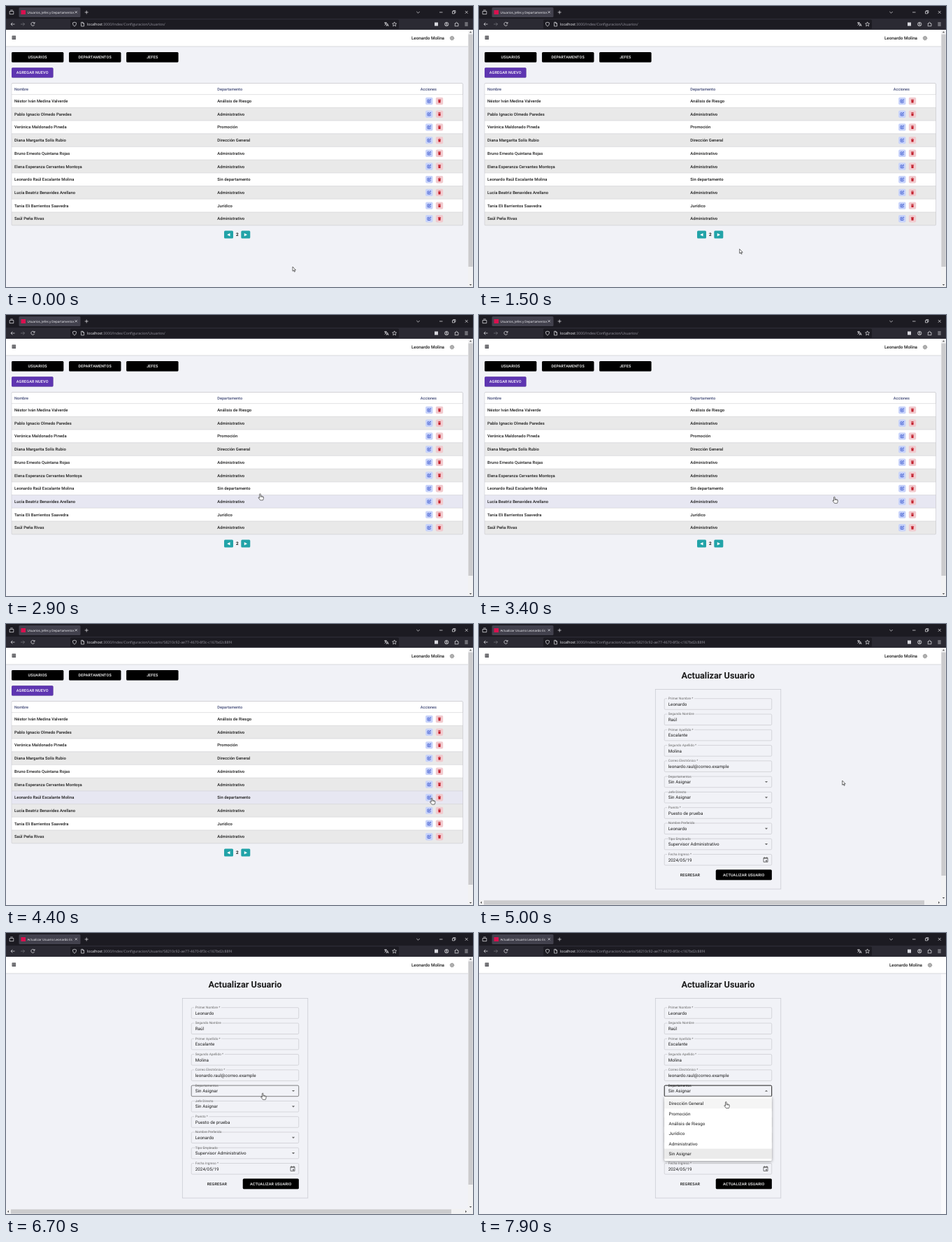
Write an HTML page that moves like this. It is 668 px wide and 402 px high and loops after 8 s.

```html
<!DOCTYPE html>
<html lang="es">
<head>
<meta charset="utf-8">
<title>Usuarios</title>
<style>
html, body { margin: 0; width: 100%; height: 100%; overflow: hidden; background: #f1f2f7; }
svg { display: block; width: 100vw; height: 100vh; }
text { font: 5.87px Roboto, sans-serif; fill: #1b1b1b; text-rendering: geometricPrecision; white-space: pre; }
.ui { font-family: "Open Sans", "Noto Sans", sans-serif; fill: #fbfbfe; }
.url { font-size: 5.22px; }
.dim { fill: #96959f; }
.tab { font-size: 4.45px; }
.cell { font-weight: 500; letter-spacing: .04px; }
.head { font-size: 5.6px; font-weight: 500; fill: #434b78; }
.btn { font-size: 5.48px; font-weight: 500; letter-spacing: .16px; text-anchor: middle; }
.value { font-size: 6.26px; letter-spacing: .06px; }
.label { font-size: 4.7px; letter-spacing: .04px; fill: #666; }
.light { fill: #fff; }
.line { fill: none; stroke: #fbfbfe; stroke-width: .65; }
.raised { filter: drop-shadow(0 .7px .7px #0006); }
.box { fill: none; stroke: #bdbec3; stroke-width: .55; }
.box.over { stroke: #212121; }
.box.focus { stroke: #111; stroke-width: .95; }
</style>
</head>
<body>
<svg id="stage" viewBox="0 0 668 402" preserveAspectRatio="none"></svg>
<script>
const LOOP = 8000, STEP = 100;
const OPEN_URL = 4400, FORM = 4500, LOADED = 4700, MENU = 7400;
const PAGE = '#f1f2f7';

const rect = (x, y, w, h, fill, extra = '') =>
  `<rect x="${x}" y="${y}" width="${w}" height="${h}" fill="${fill}" ${extra}/>`;
const text = (x, y, str, cls, extra = '') => `<text x="${x}" y="${y}" class="${cls}" ${extra}>${str}</text>`;
const path = (d, extra = 'class="line"') => `<path d="${d}" ${extra}/>`;
const group = (id, body, extra = '') => `<g id="${id}" ${extra}>${body}</g>`;
const button = (x, y, w, h, fill, str) =>
  rect(x, y, w, h, fill, 'rx="1.5" class="raised"') + text(x + w / 2, y + h / 2 + 2, str, 'btn light');

// Browser frame
const chrome = () => [
  rect(0, 0, 668, 18, '#1c1b22'), rect(0, 18, 668, 16, '#2b2a33'),
  rect(18.5, 2, 88, 14, '#42414d', 'rx="1.5"'), rect(21.5, 6, 6.5, 6, '#d9104f'),
  group('tabText', text(30.5, 10.8, '', 'ui tab'), 'clip-path="url(#tabClip)"'),
  path('M98.8 7.3l3 3m0-3l-3 3M112.700 9h5M115.200 6.500v5M587.300 8l2.200 2.200L591.700 8M620 9h4.500M656.800 7l3.800 3.800m0-3.800l-3.800 3.800M638.500 7.700h3.200v3.200h-3.200zM639.700 7.500V6.600h3.200v3.200h-1'),
  path('M5.200 7.500h5.600v4.200h-5.600zM6.200 5.900h3.600'),
  path('M12.500 26H7m2.300-2.300L7 26l2.300 2.300M40.600 24.700A2.500 2.500 0 1 0 40.700 26.700M41 23v2h-2'),
  path('M21 26h5.500m-2.300-2.300l2.300 2.300-2.300 2.300', 'class="line" opacity=".4"'),
  rect(92, 19.5, 470, 13, '#1c1b22', 'rx="1.5"'),
  path('M98 23.200l2.500.8c0 2.700-.7 4.200-2.500 5-1.800-.8-2.500-2.300-2.500-5zM107.600 23.300h2.400l1.600 1.600v4h-4zM109.800 23.300v1.800h1.800'),
  '<text id="url" y="27.800" x="116" class="ui url">localhost<tspan class="dim"></tspan></text>',
  path('M541 24h4M543 23v1m-1.500 3.500q2.300-1 2.700-3.500m-2.200 0q.7 2 2 2.700M544 29l1.600-4 1.600 4m-2.700-1.300h2.200'),
  path('M555.600 22.900l.9 2 2.100.2-1.600 1.500.5 2.200-1.900-1.200-1.900 1.200.5-2.200-1.600-1.500 2.100-.2z'),
  rect(613, 23.5, 5, 5, '#d8d8de'),
  path('M632.900 26a2.700 2.700 0 1 1-5.400 0a2.700 2.700 0 1 1 5.400 0M628.500 27.700q1.700-1.600 3.400 0M631.100 25.200a.9.9 0 1 1-1.800 0a.9.9 0 1 1 1.800 0'),
  path('M642 25h1.500v-1q1-1.500 2 0v1h1.500v3.700h-5v-1.200q1.500-.7 0-1.500z'),
  path('M656.300 24h4.400m-4.400 2h4.400m-4.400 2h4.400')
].join('');

const header = () =>
  rect(0, 34, 668, 24, '#fff') + rect(0, 57.6, 668, .7, '#c9cad0') +
  rect(8.5, 42.5, 5.6, 5.4, '#5c5c60', 'rx=".4"') +
  path('M8.500 44.300h5.600m-5.600 1.800h5.600', 'stroke="#ddd" stroke-width=".35"') +
  group('account',
    text(627, 48, 'Leonardo Molina', '', 'text-anchor="end" style="font-size:6.26px;font-weight:500"') +
    '<g fill="none" stroke="#444"><circle cx="638" cy="46" r="2.100" stroke-width=".6"/><circle cx="638" cy="46" r="2.700" stroke-width=".8" stroke-dasharray="1.060"/><circle cx="638" cy="46" r=".8" stroke-width=".5"/></g>');

const arrow = (x, y, turn) =>
  path('M-1.700 1L0-1L1.700 1z', `fill="#555" transform="translate(${x} ${y}) rotate(${turn})"`);
const bars = (bottom, thumbEnd) =>
  rect(661, 34, 7, bottom - 34, '#f2f2f3') + rect(661.4, 40.5, 6.2, thumbEnd - 40.5, '#cbcbcd') +
  arrow(664.5, 37.2, 0) + arrow(664.5, bottom - 3, 180);

// User list
const ROW_TOP = 126.6, ROW_H = 18.7;
const people = [
  ['Néstor Iván Medina Valverde', 'Análisis de Riesgo'],
  ['Pablo Ignacio Olmedo Paredes', 'Administrativo'],
  ['Verónica Maldonado Pineda', 'Promoción'],
  ['Diana Margarita Solís Rubio', 'Dirección General'],
  ['Bruno Ernesto Quintana Rojas', 'Administrativo'],
  ['Elena Esperanza Cervantes Montoya', 'Administrativo'],
  ['Leonardo Raúl Escalante Molina', 'Sin departamento'],
  ['Lucía Beatriz Benavides Arellano', 'Administrativo'],
  ['Tania Eli Barrientos Saavedra', 'Jurídico'],
  ['Saúl Peña Rivas', 'Administrativo']
];
const rowFill = i => i % 2 ? '#e9e9e9' : '#fff';

const row = ([name, area], i) => {
  const y = ROW_TOP + i * ROW_H, mid = y + 9.4;
  return rect(8, y, 645.5, ROW_H, rowFill(i), 'class="row"') +
    path(`M8 ${y}H653.500`, 'stroke="#c6c6ca" stroke-width=".5"') +
    text(12, mid + 2, name, 'cell') + text(302.3, mid + 2, area, 'cell') +
    rect(600.1, mid - 5.2, 10.4, 10.4, '#c8d3fa', 'rx="1.800"') +
    rect(614.8, mid - 5.2, 10.4, 10.4, '#f1cbcf', 'rx="1.800"') +
    `<use href="#edit" x="605.300" y="${mid}"/><use href="#trash" x="620" y="${mid}"/>`;
};

const list = () =>
  ['USUARIOS', 'DEPARTAMENTOS', 'JEFES'].map((s, i) => button(8 + 82.1 * i, 66, 74.3, 14.4, '#000', s)).join('') +
  button(8, 88.3, 59.5, 14.3, '#5e35b1', 'AGREGAR NUEVO') +
  rect(8, 110.5, 645.5, 203.3, '#fff', 'rx="1.500" class="raised"') +
  text(12, 120.6, 'Nombre', 'head') + text(302.3, 120.6, 'Departamento', 'head') + text(592.8, 120.6, 'Acciones', 'head') +
  people.map(row).join('') +
  rect(8, 110.5, 645.5, 203.3, 'none', 'rx="1.500" stroke="#c2c2c8" stroke-width=".5"') +
  rect(312, 321.5, 13, 11, '#22a3a8', 'rx="1.500"') + rect(336.3, 321.5, 13, 11, '#22a3a8', 'rx="1.500"') +
  path('M320.500 325v4.400L316.200 327.200zM340.800 325v4.400L345.100 327.200z', 'fill="#fff"') +
  text(330.8, 329.3, '2', '', 'text-anchor="middle" style="font-size:6.3px;font-weight:700"') +
  bars(402, 373);

// User form
const FIELD_TOP = 106.7, FIELD_GAP = 22.28, FIELD_H = 15.6;
const fields = [
  ['Primer Nombre *', 'Leonardo'], ['Segundo Nombre', 'Raúl'],
  ['Primer Apellido *', 'Escalante'], ['Segundo Apellido *', 'Molina'],
  ['Correo Electrónico *', 'leonardo.raul@correo.example'],
  ['Departamentos', 'Sin Asignar', 1], ['Jefe Directo', 'Sin Asignar', 1],
  ['Puesto *', 'Puesto de prueba'], ['Nombre Preferido', 'Leonardo', 1],
  ['Tipo Empleado', 'Supervisor Administrativo', 1], ['Fecha Ingreso *', '2024/05/19']
];
const SELECT = 5;
const caret = (y, extra = '') =>
  path(`M408.900 ${y - .9}h4.200l-2.100 2.100z`, `fill="#666" ${extra}`);

const field = ([label, value, isSelect], i) => {
  const y = FIELD_TOP + i * FIELD_GAP, mid = y + FIELD_H / 2;
  return rect(265.2, y, 153.5, FIELD_H, 'none', 'rx="1.500" class="box"') +
    (isSelect ? caret(mid, i === SELECT ? 'id="caret"' : '') : '') +
    `<g class="filled">${isSelect ? '' : rect(269.3, y - .8, 0, 1.6, PAGE, 'class="notch"')}` +
    text(270.8, y + 1.4, label, 'label') + text(270.7, mid + 2.2, value, 'value') + '</g>' +
    `<g class="empty">${text(270.7, mid + 2.2, label, 'value', 'style="fill:#666"')}</g>`;
};

const form = () =>
  text(342, 77.7, 'Actualizar Usuario', '', 'text-anchor="middle" style="font-size:12.7px;font-weight:700"') +
  rect(252.3, 93.6, 179.5, 285.5, PAGE, 'stroke="#c5c6ce" stroke-width=".7"') +
  fields.map(field).join('') +
  path('M407 334.500h6v6h-6zM407 335.300h6M408.300 334.500v-1.200M411.700 334.500v-1.200M410.300 338h1.300v1.300h-1.300z', 'fill="none" stroke="#555" stroke-width=".8"') +
  text(302, 360.8, 'REGRESAR', 'btn') + button(338.8, 351.6, 80, 14.7, '#000', 'ACTUALIZAR USUARIO') +
  group('formBars', bars(395, 360) + rect(0, 395, 668, 7, '#f2f2f3') + rect(7, 395.4, 630, 6.2, '#cbcbcd') +
    arrow(3, 398.5, -90) + arrow(658, 398.5, 90)) +
  group('gutter', rect(661, 58.3, 7, 344, '#fafafc'));

// Dropdown
const ITEM_TOP = 236.9, ITEM_H = 14.35;
const options = ['Dirección General', 'Promoción', 'Análisis de Riesgo', 'Jurídico', 'Administrativo', 'Sin Asignar'];
const menu = () =>
  rect(265.2, 233.8, 153.5, 92.3, '#fff', 'rx="1.500" style="filter:drop-shadow(0 1.5px 2px #0006)"') +
  options.map((s, i) => rect(265.2, ITEM_TOP + i * ITEM_H, 153.5, ITEM_H, '#fff', 'class="item"') +
    text(271.5, ITEM_TOP + i * ITEM_H + 9.4, s, 'value')).join('');

const pointers = () => {
  const skin = 'fill="#fff" stroke="#111" stroke-width=".6" stroke-linejoin="round"';
  return path('M0 0V6.300L1.500 5 2.500 7.300 3.500 6.900 2.500 4.700H4.500z', `id="arrow" ${skin}`) +
    path('M-.8.600Q0-.4.800.600V3.500Q1.700 3 2.300 3.700 3.200 3.300 3.700 4.200 4.700 4 4.800 5V7Q4.600 8.200 4 9.300H.2L-2.300 6.200Q-2.700 5.200-1.700 5.200L-.8 6zM.9 3.700V5M2.300 3.900V5.100M3.700 4.300V5.300', `id="hand" ${skin}`) +
    path('M-1.300-3.300Q0-3.300 0-2.600Q0-3.300 1.300-3.300M0-2.600V2.600M-1.300 3.300Q0 3.300 0 2.600Q0 3.300 1.300 3.300', 'id="beam" fill="none" stroke="#222" stroke-width=".6"');
};

const defs = `<defs><clipPath id="tabClip"><rect x="30" y="3" width="67.500" height="12"/></clipPath>
<path id="edit" d="M-.3-2H-1.700Q-2.300-2-2.300-1.400V1.600Q-2.300 2.200-1.700 2.200H1.300Q1.900 2.200 1.900 1.600V.3M-.8.700-.5-.5 1.600-2.600 2.500-1.700.4.400Z" fill="none" stroke="#2746c9" stroke-width=".75"/>
<path id="trash" d="M-1.700-1.200H1.700L1.500 2.500H-1.500ZM-2.100-2.200H-.8L-.5-2.600H.5L.8-2.200H2.100V-1.600H-2.100Z" fill="#c3222f"/></defs>`;

const $ = s => document.querySelector(s), $$ = s => [...document.querySelectorAll(s)];
$('#stage').innerHTML = defs + rect(0, 0, 668, 402, PAGE) + group('list', list()) + group('form', form()) +
  header() + group('headBar', bars(402, 373)) + group('formHeadBar', bars(395, 360)) +
  chrome() + group('menu', menu()) + group('pointer', pointers());

$$('.notch').forEach(n => n.setAttribute('width', n.nextElementSibling.getComputedTextLength() + 3));

// Pointer route: time, x, y
const route = [
  [0, 410, 373], [1100, 410, 373], [1400, 386, 355], [1700, 346, 333], [2000, 323, 331],
  [2300, 348, 324], [2600, 374.7, 300], [2900, 363.5, 255.6],
  [3300, 470, 264], [3600, 585, 252], [3800, 608, 248], [3900, 609, 248.8], [4600, 609, 248.8],
  [5000, 519.7, 224], [5500, 402, 150], [5800, 376, 116], [6100, 364, 140], [6400, 362, 201],
  [6700, 367.2, 229], [7400, 367.2, 229], [7800, 353.3, 241.3], [8000, 353.3, 241.3]
];
const pointAt = t => {
  const i = Math.max(1, route.findIndex(p => p[0] >= t));
  const [t0, x0, y0] = route[i - 1], [t1, x1, y1] = route[i];
  const k = Math.max(0, (t - t0) / (t1 - t0));
  return [x0 + (x1 - x0) * k, y0 + (y1 - y0) * k];
};
const slot = (y, top, pitch, size, count) => {
  const i = Math.floor((y - top) / pitch);
  return i >= 0 && i < count && y - top - i * pitch <= size ? i : -1;
};

const rows = $$('.row'), boxes = $$('.box'), items = $$('.item');
const show = (s, on) => $$(s).forEach(e => e.style.display = on ? '' : 'none');

function draw(t) {
  const onForm = t >= FORM, loaded = t >= LOADED, open = t >= MENU;
  const [x, y] = pointAt(t), [hx, hy] = pointAt(Math.max(0, t - STEP));

  show('#list, #headBar', !onForm);
  show('#form', onForm);
  show('#formBars, #formHeadBar', onForm && !open);
  show('#gutter, #menu', open);
  show('.filled', loaded);
  show('.empty', !loaded);
  $('#tabText text').textContent = loaded ? 'Actualizar Usuario Leonardo Es' : 'Usuarios, Jefes y Departamentos';
  $('#url tspan').textContent = ':3000/Index/Configuracion/' +
    (t >= OPEN_URL ? 'Usuario/58210c92-ae77-4670-8f3c-c167bd2c88f4' : 'Usuarios/');
  $('#account').setAttribute('transform', `translate(${open ? 7 : 0} 0)`);

  const overRow = onForm ? -1 : slot(hy, ROW_TOP, ROW_H, ROW_H, people.length);
  rows.forEach((r, i) => r.setAttribute('fill', i === overRow ? '#e7e7f2' : rowFill(i)));

  const inForm = onForm && hx > 265 && hx < 419;
  const overField = inForm && !open ? slot(y, FIELD_TOP, FIELD_GAP, FIELD_H, fields.length) : -1;
  boxes.forEach((b, i) => {
    b.classList.toggle('over', i === overField);
    b.classList.toggle('focus', open && i === SELECT);
  });
  $$('.label')[SELECT].style.fill = open ? '#111' : '';
  $('#caret').setAttribute('transform', open ? 'rotate(180 411 225.900)' : '');

  // Dropdown grows out of its field
  const grow = 1 - (1 - Math.min(1, Math.max(0, (t - MENU) / 300))) ** 2;
  const scale = .75 + .25 * grow;
  $('#menu').style.opacity = grow;
  $('#menu').setAttribute('transform', `translate(342 234) scale(${scale} ${scale * scale}) translate(-342 -234)`);
  const overItem = open ? slot(y, ITEM_TOP, ITEM_H, ITEM_H, options.length) : -1;
  items.forEach((e, i) => e.setAttribute('fill',
    i === options.length - 1 ? '#ebebeb' : i === overItem ? '#f5f5f5' : '#fff'));

  const onPager = !onForm && y > 321 && y < 333 && (x > 312 && x < 325 || x > 336 && x < 349);
  const isSelect = overField >= 0 && fields[overField][2];
  const kind = overRow >= 0 || onPager || isSelect || open ? 'hand' : overField >= 0 ? 'beam' : 'arrow';
  ['arrow', 'hand', 'beam'].forEach(k => show('#' + k, k === kind));
  $('#pointer').setAttribute('transform', `translate(${x} ${y})`);
}

const start = performance.now();
function tick() {
  const t = (performance.now() - start) % LOOP;
  draw(Math.floor(t / STEP) * STEP);
  requestAnimationFrame(tick);
}
tick();
</script>
</body>
</html>
```
